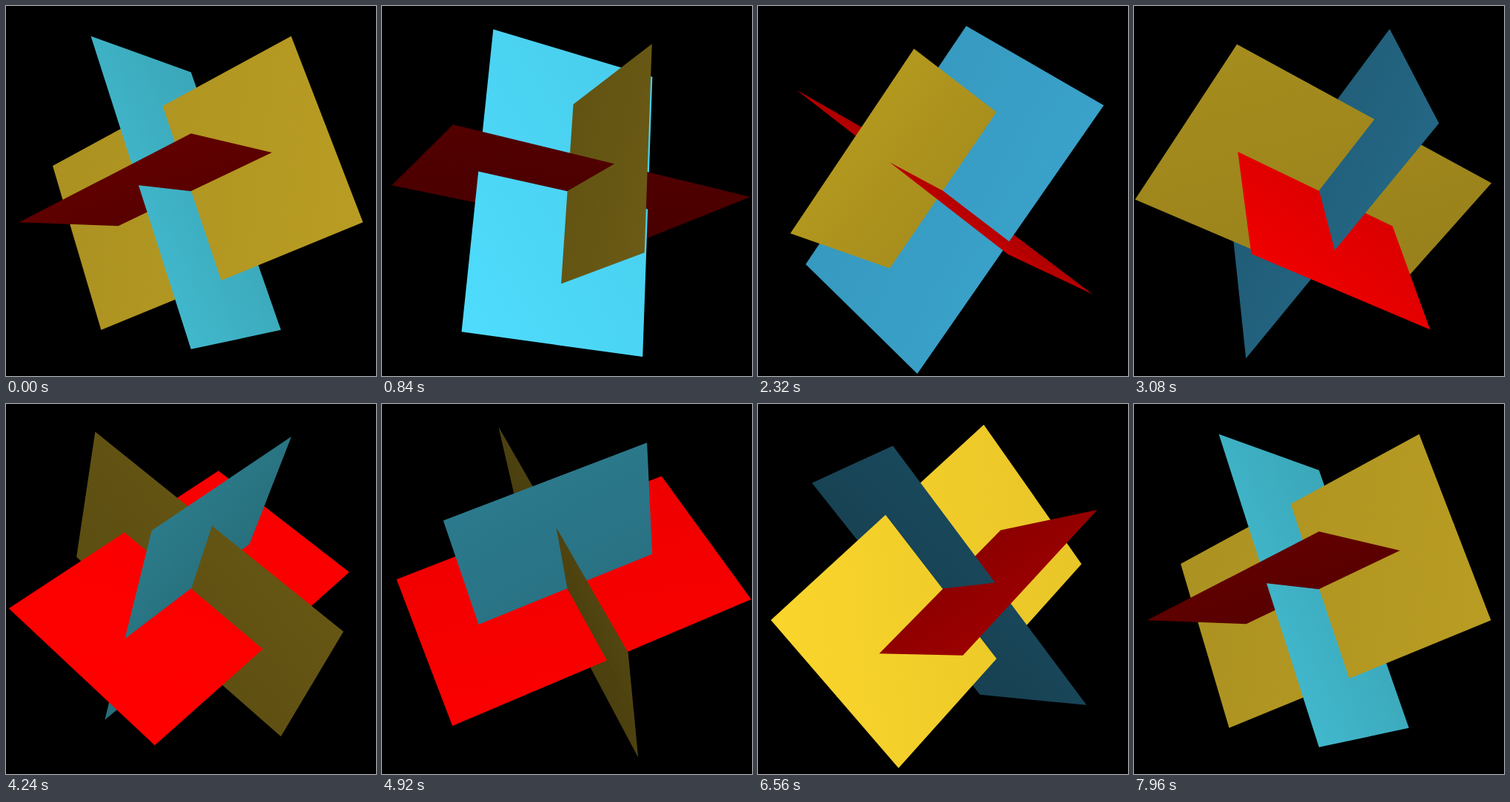
An HTML page with a canvas that plays this animation: 500 px wide and 500 px high, repeating every 8 s.

```html
<!DOCTYPE html>
<html lang="en">
<head>
<meta charset="utf-8">
<title>Three golden rectangles</title>
<style>
html, body { margin: 0; width: 100%; height: 100%; overflow: hidden; background: #000; }
canvas { display: block; width: 500px; height: 500px; }
</style>
</head>
<body>
<canvas id="stage" width="500" height="500"></canvas>
<script>
const ctx = document.getElementById('stage').getContext('2d');
const PHI = (1 + Math.sqrt(5)) / 2;
const TILT = 17.1 * Math.PI / 180;
const FOCAL = 1128, DIST = 8.81;
const STEP = 40, STEPS = 200;
const OVERLAP = 0.005;

// Body axes at rest: sideways, up, front. The spin is about "up".
const AXES = [
  [PHI / 2, 0.5, 0.5 / PHI],
  [-0.5 / PHI, PHI / 2, -0.5],
  [-0.5, 0.5 / PHI, PHI / 2]
];

// Each rectangle: indices of its long, short and normal axis.
const RECTS = [
  { long: 0, short: 1, normal: 2, color: [252, 214, 46] },
  { long: 1, short: 2, normal: 0, color: [75, 211, 252] },
  { long: 2, short: 0, normal: 1, color: [255, 0, 0] }
];

function spin([x, u, m], a) {
  const c = Math.cos(a), s = Math.sin(a);
  return [x * c - m * s, u, m * c + x * s];
}

function toView([x, u, m]) {
  const c = Math.cos(TILT), s = Math.sin(TILT);
  return [x, m * s - u * c, u * s + m * c];
}

function project([x, y, z]) {
  const k = FOCAL / (DIST - z);
  return [250 + x * k, 250 + y * k];
}

const mix = (a, p, b, q) => a.map((v, i) => v * p + b[i] * q);

// Soft light from the upper right, in front.
function brightness([x, u, m]) {
  const v = 0.22 * x + 0.434 * u + 0.4 * m;
  return 0.24 + 0.195 * Math.log(1 + Math.exp(v / 0.15)) - 0.18 * x * x * u - 0.06 * x * u;
}

function rgb([r, g, b], level, side) {
  const c = [r, g, b * (1 - 0.09 * side)].map(v => Math.min(255, Math.round(v * level)));
  return `rgb(${c})`;
}

// Surfaces brighten slightly towards the viewer.
function paintFor(rect, world, view) {
  const n = view[rect.normal];
  const sign = n[2] > 0 ? 1 : -1;
  const normal = world[rect.normal].map(v => v * sign);
  const level = brightness(normal);
  const slope = Math.sqrt(Math.max(1e-6, 1 - n[2] * n[2]));
  const w = n.map((v, i) => ((i === 2 ? 1 : 0) - n[2] * v) / slope);
  const far = project(w.map(v => -2 * v));
  const near = project(w.map(v => 2 * v));
  const paint = ctx.createLinearGradient(...far, ...near);
  paint.addColorStop(0, rgb(rect.color, level * (1 - 0.08 * slope), normal[0]));
  paint.addColorStop(1, rgb(rect.color, level * (1 + 0.08 * slope), normal[0]));
  return paint;
}

function draw(step) {
  const angle = 2 * Math.PI * step / (STEPS - 1);
  const world = AXES.map(a => spin(a, angle));
  const view = world.map(toView);
  const facing = view.map(a => Math.sign(a[2]));
  const pieces = [];

  // The planes cut each rectangle in four; quarters sort from back to front.
  for (const rect of RECTS) {
    const paint = paintFor(rect, world, view);
    for (const s of [-1, 1]) {
      for (const t of [-1, 1]) {
        const corner = (p, q) => project(mix(view[rect.long], p * s, view[rect.short], q * t));
        pieces.push({
          paint,
          order: s * facing[rect.long] + t * facing[rect.short],
          points: [
            corner(-OVERLAP, -OVERLAP), corner(PHI, -OVERLAP),
            corner(PHI, 1), corner(-OVERLAP, 1)
          ]
        });
      }
    }
  }
  pieces.sort((a, b) => a.order - b.order);

  ctx.fillStyle = '#000';
  ctx.fillRect(0, 0, 500, 500);
  for (const { paint, points } of pieces) {
    ctx.fillStyle = paint;
    ctx.beginPath();
    points.forEach(p => ctx.lineTo(...p));
    ctx.fill();
  }
}

const start = performance.now();
function tick() {
  const t = performance.now() - start;
  draw(Math.floor((t + 1) / STEP) % STEPS);
  requestAnimationFrame(tick);
}
tick();
</script>
</body>
</html>
```
